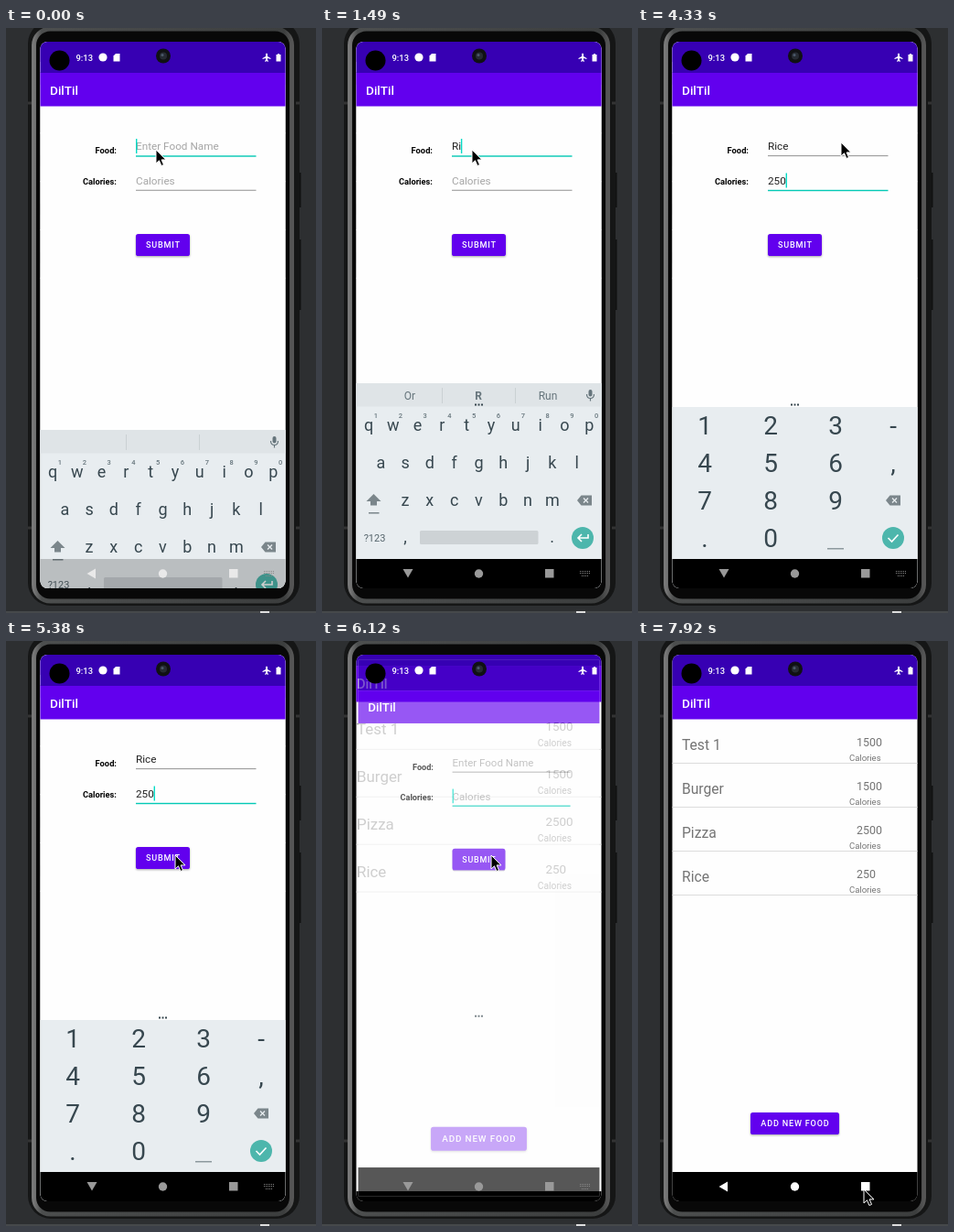
An HTML page that plays this animation: 339 px wide and 639 px high, repeating every 8000 ms.

```html
<!DOCTYPE html>
<html lang="en">
<head>
<meta charset="utf-8">
<title>Food log</title>
<style>
html, body { margin: 0; height: 100%; overflow: hidden; background: #2d2f31; }
svg { display: block; width: 100vw; height: 100vh; font-family: Roboto, sans-serif; }
text { white-space: pre; }
.mid { text-anchor: middle; }
.end { text-anchor: end; }
.bold { font-weight: 700; }
.medium { font-weight: 500; }
.button { font-weight: 500; letter-spacing: .8px; text-anchor: middle; fill: #fff; }
</style>
</head>
<body>
<svg viewBox="0 0 339 639">
  <defs>
    <clipPath id="screen"><rect x="37.5" y="15" width="268" height="597" rx="8"/></clipPath>
    <linearGradient id="rim">
      <stop offset="0" stop-color="#777"/><stop offset=".03" stop-color="#4c4e4e"/>
      <stop offset=".97" stop-color="#3c3e3e"/><stop offset="1" stop-color="#555"/>
    </linearGradient>
    <filter id="shadow"><feDropShadow dx="0" dy="1" stdDeviation=".8" flood-opacity=".35"/></filter>
  </defs>
  <rect width="339" height="639" fill="#2d2f31"/>
  <path d="M0 638h339" stroke="#46494b" stroke-width="2"/>
  <path d="M278 638h10" stroke="#ddd" stroke-width="2"/>
  <path d="M321 158v38M321 231v77" stroke="#111" stroke-width="3"/>
  <rect x="24" y="-8" width="297" height="639" rx="25" fill="#151616"/>
  <rect x="30.5" y="1" width="282" height="625" rx="18" fill="#080808" stroke="url(#rim)" stroke-width="5"/>
  <path d="M24 82h4M317 82h4M24 546h4M317 546h4" stroke="#333" stroke-width="3"/>
  <g clip-path="url(#screen)">
    <g id="list"></g>
    <g id="form"></g>
    <g id="system" fill="#fff">
      <circle cx="58.5" cy="35.5" r="11" fill="#000"/>
      <text x="76.5" y="35.5" font-size="9.4" class="medium">9:13</text>
      <circle cx="106" cy="32" r="4.6"/>
      <path d="M120 28h4.5v8.5h-7v-6z"/>
      <path d="M285 27.5q1 0 1 1.5v2l3.5 2v1l-3.5-1v2l1 1v.8l-2-.6-2 .6v-.8l1-1v-2l-3.5 1v-1l3.5-2v-2q0-1.500 1-1.500z"/>
      <path d="M295.500 29h1.500v-1h2v1h1.500v7.500h-5z"/>
      <g id="nav">
        <path id="back"/>
        <circle cx="171.500" cy="596" r="4.700"/>
        <rect x="244" y="591" width="9.500" height="9.500"/>
      </g>
      <path id="keysIcon" stroke="#888" stroke-dasharray="1 1" d="M282 593.500h11M282 595.500h11M284 598.500h7"/>
    </g>
  </g>
  <circle cx="172" cy="30.500" r="8" fill="#101114"/>
  <circle cx="172" cy="30.500" r="4" fill="#262b33"/>
  <circle cx="171" cy="29.500" r="1.500" fill="#4b596a"/>
  <path id="mouse" d="M0 0v15l3.500-3.200 2.400 5.700 2.600-1.100-2.400-5.500h4.900z" fill="#000" stroke="#fff" stroke-width="1"/>
</svg>
<script>
const $ = id => document.getElementById(id);
const set = (id, attrs) => { for (const k in attrs) $(id).setAttribute(k, attrs[k]); };
const show = (id, on) => set(id, { visibility: on ? 'visible' : 'hidden' });
const text = (x, y, size, str, extra = '') => `<text x="${x}" y="${y}" font-size="${size}" ${extra}>${str}</text>`;
const rect = (x, y, w, h, fill, extra = '') => `<rect x="${x}" y="${y}" width="${w}" height="${h}" fill="${fill}" ${extra}/>`;
const centred = (x, y, size, str, extra = '') => text(x, y, size, str, 'class="mid" ' + extra);

const windowBase = rect(37, 15, 269, 597, '#fefefe') + rect(37, 15, 269, 34, '#3700b3') +
  rect(37, 49, 269, 36.5, '#6200ee') + text(48, 72.5, 13.6, 'DilTil', 'fill="#fff" class="medium"');
const button = (x, y, w, label, id) => rect(x, y, w, 24, '#6200ee', `rx="2.6" filter="url(#shadow)" id="${id}"`) +
  text(171.9, y + 15.3, 9.1, label, 'class="button"');

// Food list
const foods = [['Test 1', 1500], ['Burger', 1500], ['Pizza', 2500], ['Rice', 250]];
$('list').innerHTML = windowBase + foods.map(([name, kcal], i) => {
  const y = 85.5 + 48 * i;
  return `<g fill="#747474">${text(48, y + 33, 15.65, name)}${text(239, y + 29.5, 12.4, kcal)}` +
    `${text(231, y + 45, 9.5, 'Calories')}</g>` + rect(37, y + 47.5, 269, 1, '#dcdcdc');
}).join('') + button(123, 515, 97, 'ADD NEW FOOD', 'add') + rect(37, 580, 269, 32, '#000');

// Keyboards
const backspace = (x, y) => `<path d="M${x - 8} ${y}l4.500-5.500h11.500v11h-11.500z" fill="#7b868b"/>` +
  `<path d="M${x - 1} ${y - 2.500}l5 5m0-5l-5 5" stroke="#e8edf0" stroke-width="1.300"/>`;
const roundKey = (x, icon) => `<circle cx="${x}" cy="557" r="12" fill="#4db6ac"/>` +
  `<path d="${icon}" fill="none" stroke="#fff" stroke-width="1.600"/>`;
const row = (keys, x, y) => [...keys].map((k, i) => centred(x + 26.8 * i, y, 18, k)).join('');
const letters = rect(37, 388, 269, 230, '#e8edf0') + rect(37, 388, 269, 25.500, '#dfe4e7') +
  rect(131, 393, .8, 17, '#c5cccf') + rect(211, 393, .8, 17, '#c5cccf') +
  [96, 171, 247].map((x, i) => centred(x, 405.500, 12, '', `id="hint${i}" fill="#66757c" ${i == 1 ? 'font-weight="700"' : ''}`)).join('') +
  `<path id="dots" d="M167 411.500h9" stroke="#37474f" stroke-width="2" stroke-dasharray="2 1.500"/>` +
  `<rect x="291.500" y="395" width="4" height="7.500" rx="2" fill="#66757c"/>` +
  `<path d="M289.500 400q0 4.500 4 4.500t4-4.500m-4 4.500v3" fill="none" stroke="#66757c" stroke-width="1.200"/>` +
  row('qwertyuiop', 51, 440) + row('asdfghjkl', 64.300, 481) + row('zxcvbnm', 91, 522) +
  [...'1234567890'].map((d, i) => centred(59 + 26.8 * i, 425.500, 7.500, d, 'fill="#66757c" font-weight="500"')).join('') +
  `<path d="M56.500 509l8 8h-4.500v4.500h-7v-4.500h-4.500z" fill="#7b868b"/>` + rect(51, 529, 11.500, 1.500, '#7b868b') +
  backspace(287, 516) + centred(57.500, 561, 11, '?123', 'fill="#56656c"') + centred(91, 562, 18, ',') +
  rect(107, 549, 129.500, 15, '#cdd2d5', 'rx="1.500"') + centred(251.500, 562, 18, '.') +
  roundKey(285, 'M291 553v4h-11m4-4l-4 4 4 4');
const digits = rect(37, 414, 269, 198, '#e8edf0') +
  ['123-', '456,', '789', '.0'].map((keys, r) => [...keys].map((k, c) =>
    centred([73, 145, 216, 279][c], 444 + 41 * r, 28, k)).join('')).join('') +
  rect(207, 568, 18, 1.500, '#8d999e') + backspace(279, 516) + roundKey(279, 'M273.500 557l4 4 7-7.500');

// Entry form
const field = (id, y, hint) => text(142, y, 11.74, hint, `id="${id}Hint" fill="#a5a5a5"`) +
  text(142, y, 11.74, '', `id="${id}" fill="#222"`) +
  rect(142, y + 6, 131.500, .8, '#777', `id="${id}Line"`) + rect(142, y - 12, 1.400, 16, '#03dac5', `id="${id}Caret"`);
$('form').innerHTML = windowBase +
  text(121, 137.300, 9.3, 'Food:', 'class="end bold"') + text(121, 170.800, 9.3, 'Calories:', 'class="end bold"') +
  field('food', 133.300, 'Enter Food Name') + field('kcal', 170.800, 'Calories') +
  button(142, 225, 59, 'SUBMIT', 'submit') +
  `<g fill="#37474f"><g id="letters">${letters}</g><g id="digits">${digits}</g></g>` +
  rect(37, 580, 269, 32, '#000', 'id="navBar"');

// Last step whose start is reached
const pick = (n, steps) => steps.filter(s => s[0] <= n).pop()[1];
// Linear interpolation through [tick, ...values]
function follow(n, path) {
  const i = path.findIndex(p => p[0] > n);
  if (i < 0) return path[path.length - 1].slice(1);
  const a = path[i - 1], b = path[i], k = (n - a[0]) / (b[0] - a[0]);
  return a.slice(1).map((v, j) => v + (b[j + 1] - v) * k);
}
const zoom = s => ({ transform: `translate(171.5 320) scale(${s}) translate(-171.5 -320)` });

const foodSteps = [[0, ''], [7, 'R'], [10, 'Ri'], [12, 'Ric'], [13, 'Rice'], [39, '']];
const kcalSteps = [[0, ''], [22, '2'], [26, '25'], [29, '250'], [39, '']];
const hintSteps = [[0, ['', '', '']], [8, ['Or', 'R', 'Run']], [11, ['Rio', 'Ri', 'Rid']],
  [13, ['Rich', 'Ric', 'Rice']], [14, ['Ride', 'Rice', 'Rich']]];
const mousePath = [[0, 164, 133], [15, 164, 133], [17, 171, 166], [18, 171, 166], [20, 222, 125], [30, 222, 125],
  [36, 185, 234], [41, 185, 234], [45, 237, 549], [48, 273, 590], [52, 247, 599]];
const slidePath = [[0, 51], [1, 8], [2, 0]];
const zoomPath = [[0, 0], [40, 0], [41, .19], [42, .82], [43, .97], [44, 1]];

function updateField(id, value, focused, caret, y) {
  $(id).textContent = value;
  show(id + 'Hint', !value);
  set(id + 'Line', focused ? { fill: '#03c9b6', height: 1.4 } : { fill: '#777', height: .8 });
  const x = value ? 141.8 + $(id).getComputedTextLength() : 142;
  set(id + 'Caret', { x, y, visibility: focused && caret ? 'visible' : 'hidden' });
}

function draw(n) {
  const onKcal = n >= 17, formShown = n < 42;
  updateField('food', pick(n, foodSteps), !onKcal, n < 2 || n > 4, 121);
  updateField('kcal', pick(n, kcalSteps), onKcal, true, 158.5);
  const hints = pick(n, hintSteps);
  hints.forEach((h, i) => $('hint' + i).textContent = h);
  show('dots', hints[1]);
  show('letters', !onKcal);
  show('digits', onKcal && n < 40);
  set('letters', { transform: `translate(0 ${follow(n, slidePath)[0]})` });
  set('navBar', { opacity: pick(n, [[0, .2], [1, .85], [2, 1]]) });
  set('submit', { fill: n == 37 || n == 38 ? '#7d38f1' : '#6200ee' });

  const p = follow(n, zoomPath)[0];
  set('form', { ...zoom(1 - .1 * p), opacity: n == 41 ? .66 : 1, display: formShown ? 'inline' : 'none' });
  set('list', zoom(1.1 - .1 * p));

  set('back', { d: n > 0 && formShown ? 'M88.500 591h11l-5.500 9.500z' : 'M88.500 596l9.500-5.500v11z' });
  set('nav', { fill: n < 1 ? '#e9e9e9' : n < 47 ? '#999' : '#fff' });
  show('keysIcon', formShown);
  set('mouse', { transform: `translate(${follow(n, mousePath)})` });
}

let last = -1;
function loop() {
  const t = performance.now() % 8000;
  const n = Math.floor((t + 10 * [440, 4180, 5520].filter(s => t >= s).length) / 150);
  if (n != last) draw(last = n);
  requestAnimationFrame(loop);
}
loop();
</script>
</body>
</html>
```
